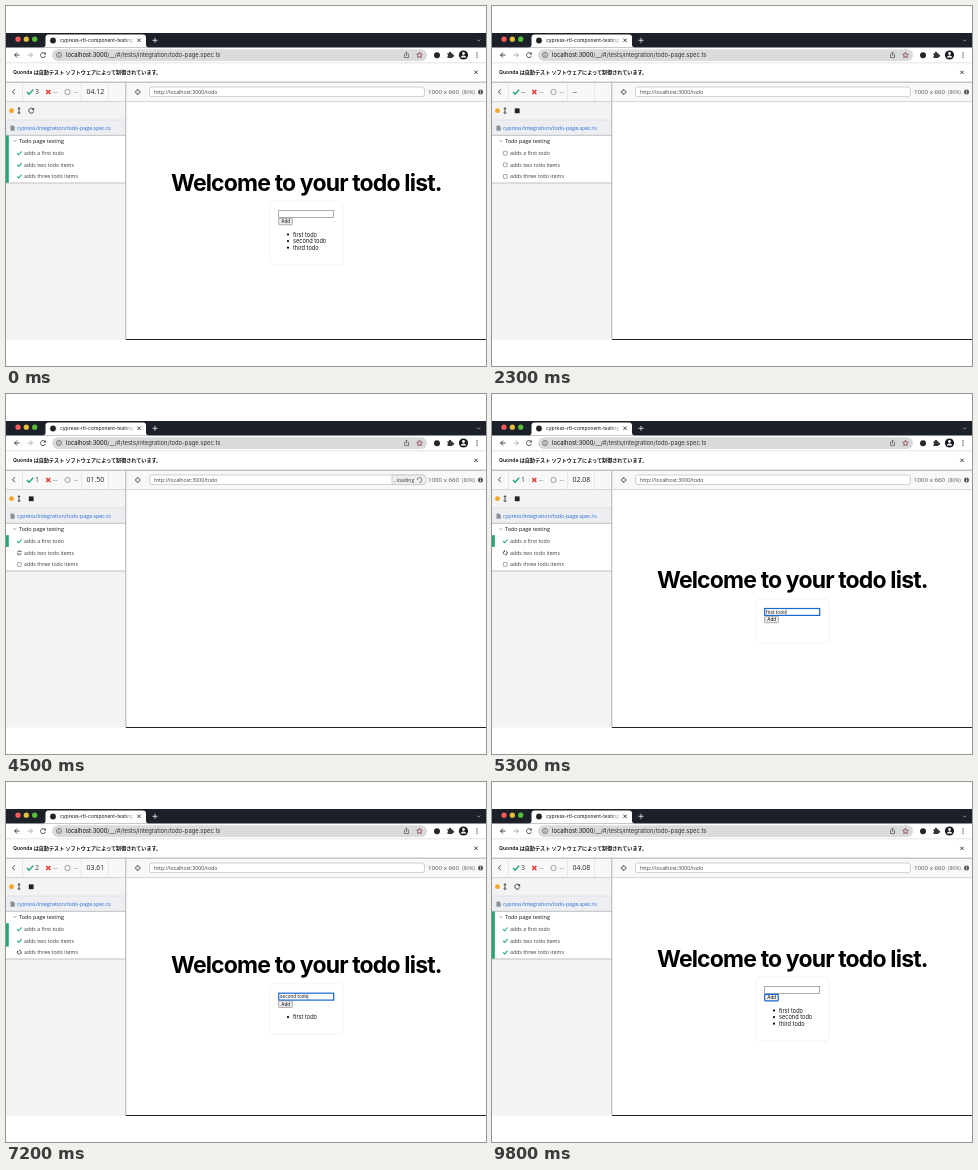
Recreate the animation shown at these times as an HTML page. Size 480 px wide and 360 px high, loop 10000 ms.

```html
<!DOCTYPE html>
<html lang="ja">
<head>
<meta charset="utf-8">
<title>Todo page testing</title>
<style>
html, body { margin: 0; width: 100%; height: 100%; overflow: hidden; background: #fff; }
svg { display: block; width: 100vw; height: 100vh; }
text { font-family: "Open Sans", sans-serif; fill: #3c3c3c; }
.ui { font-family: Inter, "Noto Sans CJK JP", "Noto Sans CJK", sans-serif; fill: #111; }
.line { fill: none; stroke: #333; stroke-width: .9; }
.rule { stroke: #ddd; stroke-width: .8; }
.ok { fill: none; stroke: #1fa971; stroke-width: 1.2; }
</style>
</head>
<body>
<svg viewBox="0 0 480 360">
  <defs>
    <path id="tick" d="M-2.4 0L-.7 1.8L2.6-1.9"/>
    <path id="cross" d="M-1.7-1.7L1.7 1.7M1.7-1.7L-1.7 1.7"/>
    <g id="reload">
      <path d="M1.9-1.5A2.5 2.5 0 1 0 2.4 .8" fill="none" stroke="currentColor" stroke-width=".9"/>
      <path d="M2.8-2.9V-.4H.3Z" fill="currentColor"/>
    </g>
    <g id="busy" fill="none" stroke="#333" stroke-width=".8">
      <path d="M-1.9-.4A1.9 1.9 0 0 1 1.6-1M1.9 .4A1.9 1.9 0 0 1-1.6 1"/>
      <path d="M.6-.8H2V-2.2ZM-.6 .8H-2V2.2Z" fill="#333" stroke="none"/>
    </g>
    <linearGradient id="fade">
      <stop offset="0" stop-color="#fff" stop-opacity="0"/><stop offset="1" stop-color="#fff"/>
    </linearGradient>
  </defs>
  <rect width="480" height="360" fill="#fff"/>

  <!-- tab strip -->
  <rect y="27" width="480" height="14.5" fill="#1c2029"/>
  <circle cx="12" cy="33.2" r="2.6" fill="#fc5b57"/>
  <circle cx="20.3" cy="33.2" r="2.6" fill="#e5bf3c"/>
  <circle cx="28.7" cy="33.2" r="2.6" fill="#57c038"/>
  <path d="M36.5 41.5Q39.5 41.5 39.5 38.5V31.4Q39.5 28.4 42.5 28.4H137Q140 28.4 140 31.4V38.5Q140 41.5 143 41.5Z" fill="#fff"/>
  <circle cx="47" cy="34.5" r="2.9" fill="#222"/>
  <text class="ui" x="54" y="36.3" font-size="5.02">cypress-rtl-component-testing</text>
  <rect x="118" y="30" width="11" height="9" fill="url(#fade)"/>
  <rect x="129" y="30" width="9" height="9" fill="#fff"/>
  <use href="#cross" class="line" x="133" y="34.3"/>
  <path d="M146.5 34.3H151.5M149 31.8V36.8" stroke="#ddd" stroke-width=".9"/>
  <path d="M471.2 33.6L472.7 35.1L474.2 33.6" fill="none" stroke="#ccc" stroke-width=".7"/>

  <!-- address bar -->
  <path class="line" d="M13.5 49H8.5M11 46.5L8.5 49L11 51.5"/>
  <path class="line" style="stroke:#aaa" d="M21.5 49H26.5M24 46.5L26.5 49L24 51.5"/>
  <use href="#reload" x="37" y="49" color="#444"/>
  <rect x="46" y="43.3" width="375" height="11.6" rx="5.8" fill="#d9dadb"/>
  <circle class="line" cx="53" cy="49" r="2.5" style="stroke:#555;stroke-width:.7"/>
  <path d="M53 48.6V50.4M53 47.3V48" stroke="#555" stroke-width=".7"/>
  <text class="ui" x="60" y="51.1" font-size="5.85">localhost:3000<tspan fill="#333">/__/#/tests/integration/todo-page.spec.ts</tspan></text>
  <path class="line" style="stroke:#555;stroke-width:.7" d="M399.3 48.2H398.5V51.6H402.5V48.2H401.7M400.5 50V46M399.3 47.2L400.5 46L401.7 47.2"/>
  <path class="line" style="stroke:#8a3b45;stroke-width:.8" d="M413.5 46.2L414.3 48.1L416.3 48.3L414.8 49.7L415.2 51.7L413.5 50.6L411.8 51.7L412.2 49.7L410.7 48.3L412.7 48.1Z"/>
  <circle cx="431" cy="49.2" r="3" fill="#252525"/>
  <path d="M441.5 47.3H443A1.1 1.1 0 1 1 445 47.3H446.5V48.8A1.1 1.1 0 1 1 446.5 50.7V52H441.5V50.3A.9 .9 0 0 0 441.5 48.7Z" fill="#333"/>
  <circle cx="457.5" cy="49" r="4.6" fill="#16181d"/>
  <circle cx="457.5" cy="47.5" r="1.4" fill="#fff"/>
  <path d="M454.8 51.6Q455 49.6 457.5 49.6T460.2 51.6Z" fill="#fff"/>
  <g fill="#444"><circle cx="471" cy="46.7" r=".7"/><circle cx="471" cy="49" r=".7"/><circle cx="471" cy="51.3" r=".7"/></g>
  <path class="rule" d="M0 56.8H480"/>
  <text class="ui" x="7" y="68.3" font-size="5.1" font-weight="600">Quonda は自動テスト ソフトウェアによって制御されています。</text>
  <use href="#cross" class="line" x="470" y="66.3"/>

  <!-- runner header -->
  <rect y="76" width="480" height="19.5" fill="#f8f8f8"/>
  <path d="M0 76.3H480" stroke="#c4c4c4" stroke-width="1.4"/>
  <path class="rule" style="stroke:#e4e4e4" d="M16.5 77V95M75.5 77V95M102.5 77V95"/>
  <path class="line" d="M8.8 83.4L6.5 85.8L8.8 88.2"/>
  <use href="#tick" class="ok" transform="translate(24 86) scale(1.25)"/>
  <use href="#cross" transform="translate(42.3 86) scale(1.2)" stroke="#e5332e" stroke-width="1.2"/>
  <circle class="line" cx="61.5" cy="86" r="2.6" style="stroke:#777;stroke-width:.7"/>
  <text id="passed" x="29" y="88.2" font-size="7"></text>
  <text x="47" y="88.2" font-size="7" style="fill:#777">--</text>
  <text x="67.5" y="88.2" font-size="7" style="fill:#777">--</text>
  <text id="timer" x="80.6" y="88.3" font-size="6.9" style="fill:#222"></text>
  <g class="line" style="stroke:#555;stroke-width:.7"><circle cx="131.7" cy="86" r="2.1"/><path d="M131.7 83V85M131.7 87V89M128.7 86H130.7M132.7 86H134.7"/></g>
  <rect x="143.5" y="81" width="275" height="9.6" rx="2.5" fill="#fff" stroke="#c4c4c4" stroke-width=".8"/>
  <text x="148" y="87.8" font-size="5.2">http://localhost:3000/todo</text>
  <g id="loading">
    <path d="M386 81H416Q420 81 420 83.5V88Q420 90.6 416 90.6H386Z" fill="#eee" stroke="#c4c4c4" stroke-width=".8"/>
    <text x="388" y="87.7" font-size="5.1">..loading</text>
    <path id="wheel" d="M2.4 0A2.4 2.4 0 1 1 .5-2.3" fill="none" stroke="#666" stroke-width=".8"/>
  </g>
  <text x="422" y="88.1" font-size="6.15" style="fill:#555">1000 x 660</text>
  <text x="456" y="87.8" font-size="5" style="fill:#666">(86%)</text>
  <circle cx="474.5" cy="86" r="2.5" fill="#555"/>
  <path d="M474.5 85.6V87.5M474.5 84.3V85" stroke="#fff" stroke-width=".8"/>

  <!-- sidebar -->
  <rect y="95.5" width="119.5" height="238" fill="#f3f3f3"/>
  <circle cx="5.5" cy="104.7" r="2.4" fill="#f5a623"/>
  <path class="line" d="M13 101.8V107.6M11.8 103L13 101.7L14.2 103M11.8 106.4L13 107.7L14.2 106.4"/>
  <use id="rerun" href="#reload" x="25.3" y="104.6" color="#333"/>
  <rect id="stop" x="22.8" y="102.4" width="4.8" height="4.8" fill="#222"/>
  <path id="hand" d="M23.4 107.8L21.3 105Q21.2 103.8 22.8 104.8V101.4Q23.5 100.4 24.2 101.4V103Q25 102.4 25.6 103.2Q26.4 102.7 26.9 103.4Q28 103 28.1 104.2V106L27.3 108Z" fill="#fff" stroke="#222" stroke-width=".8"/>
  <rect y="114" width="119.5" height="15.5" fill="#eceef2"/>
  <path class="rule" d="M0 114H119.5"/>
  <path d="M4.5 119.5H7.2L8.7 121V124.8H4.5Z" fill="#8b9096"/>
  <text x="11" y="124" font-size="5.33" style="fill:#2a6bd4">cypress/integration/todo-page.spec.ts</text>
  <rect y="129.5" width="119.5" height="47.2" fill="#fff"/>
  <path d="M0 129.3H119.5M0 177H119.5" stroke="#bbb" stroke-width=".9"/>
  <path class="line" style="stroke:#777;stroke-width:.7" d="M7.3 134.2L8.8 135.7L10.3 134.2"/>
  <text x="13" y="137" font-size="5.45" font-weight="500" style="fill:#111">Todo page testing</text>
  <rect id="bar" width="2.8" fill="#1fa971"/>
  <g id="tests"></g>
  <path d="M119.8 76.5V333.5" stroke="#aaa" stroke-width=".9"/>
  <path d="M0 95.6H480" stroke="#ccc" stroke-width=".8"/>

  <!-- page under test -->
  <g id="page">
    <text class="ui" x="300.3" y="184.6" font-size="23" font-weight="700" text-anchor="middle" letter-spacing="-.85" style="fill:#000">Welcome to your todo list.</text>
    <rect id="card" x="264" y="195.2" width="73" rx="3.5" fill="#fff" stroke="#ddd" stroke-width=".6" stroke-dasharray="1.2 .8"/>
    <rect id="field" x="272.7" y="204.6" width="55" height="6.9" fill="#fff"/>
    <text id="typed" class="ui" x="274" y="209.8" font-size="4.65"></text>
    <path id="caret" stroke="#000" stroke-width=".5"/>
    <rect id="add" x="272.7" y="212.3" width="13.6" height="6.5" rx=".7" fill="#f0f0f0"/>
    <text class="ui" x="275.2" y="217.3" font-size="4.7">Add</text>
    <g id="list"></g>
  </g>
  <path d="M120 333.5H480" stroke="#222" stroke-width="1"/>
</svg>
<script>
const $ = id => document.getElementById(id);
const todos = ["first todo", "second todo", "third todo"];
const tests = ["adds a first todo", "adds two todo items", "adds three todo items"];
const RESET = 1700, START = 2600, DONE = 8100;
const runs = [
  { start: START, show: 3700, end: 4350 },
  { start: 4350, show: 4950, end: 5900 },
  { start: 5900, show: 6550, end: DONE }
];
const clock = [[START, 0], [3100, .4], [4500, 1.5], [6300, 2.8], [7200, 3.61], [DONE, 4.08]];
const STEP = 350, TYPING = 190, CLICK = 280;

const show = (id, on) => $(id).style.display = on ? "" : "none";
const set = (id, attrs) => { for (const k in attrs) $(id).setAttribute(k, attrs[k]); };
const outline = (id, on) => set(id, { stroke: on ? "#1667d0" : "#777", "stroke-width": on ? 1.2 : .6 });

function seconds(t) {
  if (t < RESET) return 4.12;
  if (t >= DONE) return 4.08;
  const i = clock.findIndex(k => t < k[0]);
  const [a, u] = clock[i - 1], [b, v] = clock[i];
  return u + (v - u) * (t - a) / (b - a);
}

// Contents of the todo page while test number i runs
function pageAt(t, i) {
  const since = t - runs[i].show;
  if (since < 0) return null;
  const local = since - 100;
  if (local < 0) return { count: 0, typed: "", focus: "" };
  const k = Math.min(i, Math.floor(local / STEP)), part = local - k * STEP;
  if (part >= CLICK) return { count: k + 1, typed: "", focus: "add" };
  const chars = Math.ceil(todos[k].length * Math.min(1, part / TYPING));
  return { count: k, typed: todos[k].slice(0, chars), focus: "field" };
}

function testIcon(i, state, angle) {
  const at = `translate(13.3 ${147.2 + 11.6 * i})`;
  if (state === "passed") return `<use href="#tick" class="ok" transform="${at} scale(.9)"/>`;
  if (state === "running") return `<use href="#busy" transform="${at} rotate(${angle})"/>`;
  return `<rect x="-1.9" y="-1.9" width="3.8" height="3.8" rx=".4" fill="none" stroke="#888" stroke-width=".7" transform="${at}"/>`;
}

function draw(t) {
  const idle = t < RESET || t >= DONE, angle = t * .36;
  const current = runs.findIndex(r => t >= r.start && t < r.end);
  const passed = idle ? 3 : runs.filter(r => t >= r.end).length;
  const hover = t >= 1200 && t < RESET;

  $("passed").textContent = passed || "--";
  $("timer").textContent = idle || t >= START ? seconds(t).toFixed(2).padStart(5, "0") : "--";
  show("stop", !idle);
  show("rerun", idle && !hover);
  show("hand", hover);
  set("bar", { y: passed === 3 ? 129.5 : 141.2, height: passed === 3 ? 47.2 : 11.7 * passed });
  $("tests").innerHTML = tests.map((name, i) => {
    const state = i < passed ? "passed" : i === current ? "running" : "pending";
    return testIcon(i, state, angle) + `<text x="18" y="${149.1 + 11.6 * i}" font-size="5.25">${name}</text>`;
  }).join("");

  const page = idle ? { count: 3, typed: "", focus: t < 300 ? "" : "add" }
    : current < 0 ? null : pageAt(t, current);
  show("loading", current >= 0 && !page);
  set("wheel", { transform: `translate(413.5 86) rotate(${angle})` });
  show("page", page);
  if (!page) return;

  set("page", { transform: `translate(0 ${3.3 * (3 - page.count)})` });
  set("card", { height: 44 + 6.6 * page.count });
  outline("field", page.focus === "field");
  outline("add", page.focus === "add");
  $("typed").textContent = page.typed;
  const x = 274.4 + $("typed").getComputedTextLength();
  set("caret", { d: page.focus === "field" ? `M${x} 205.8V210.5` : "" });
  $("list").innerHTML = todos.slice(0, page.count).map((name, i) => {
    const y = 228.5 + 6.6 * i;
    return `<circle cx="282" cy="${y}" r="1.1"/><text class="ui" x="287" y="${y + 2}" font-size="5.65">${name}</text>`;
  }).join("");
}

const begin = performance.now();
function tick() {
  const t = (performance.now() - begin) % 10000;
  draw(Math.floor(t / 100) * 100);
  requestAnimationFrame(tick);
}
tick();
</script>
</body>
</html>
```
